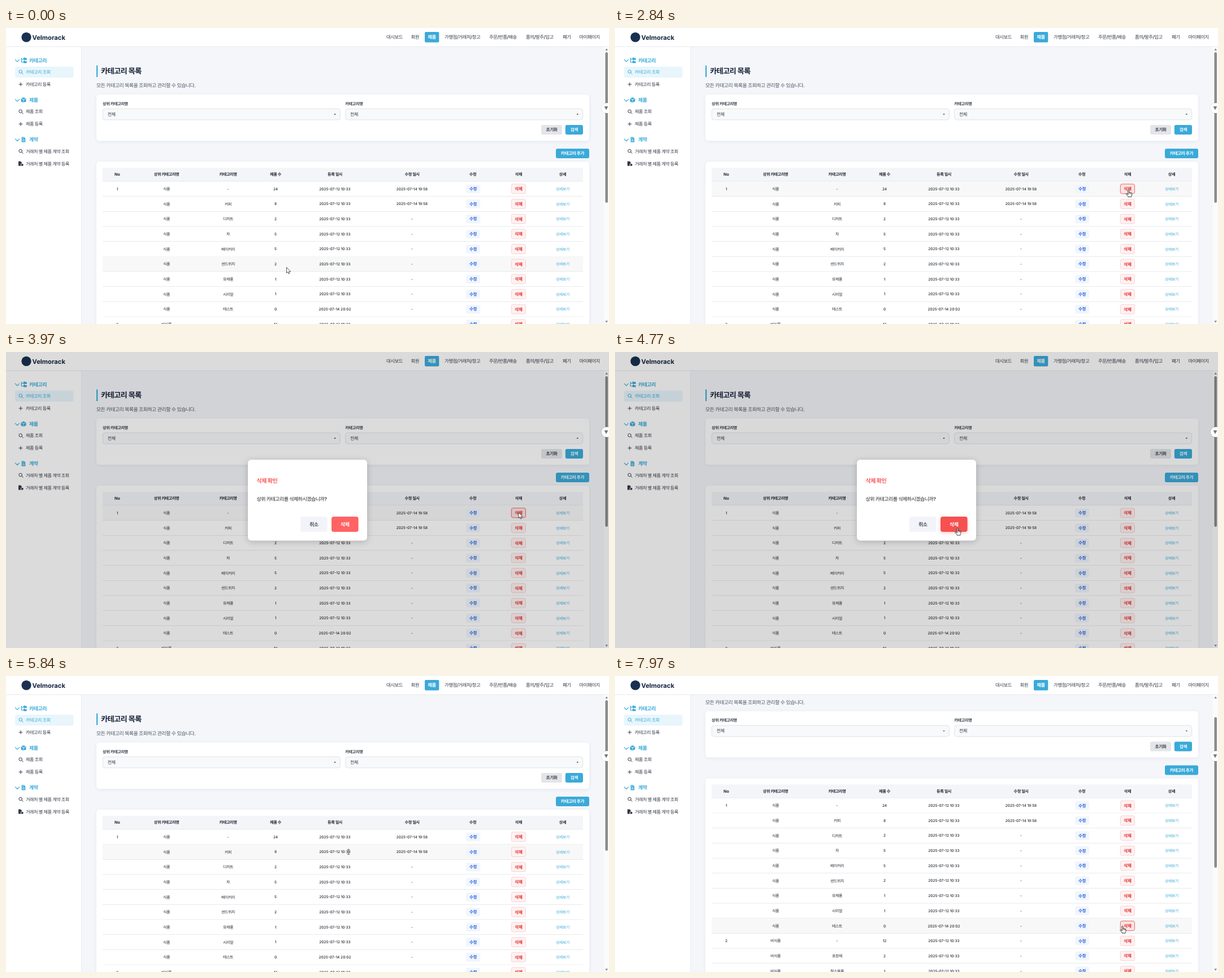
Animation, 1067 px wide and 525 px high, one loop 8 s. Source, as an HTML page with a canvas:

```html
<!DOCTYPE html>
<html lang="ko">
<head>
<meta charset="utf-8">
<title>카테고리 목록</title>
<style>
html, body { margin: 0; width: 100%; height: 100%; overflow: hidden; background: #fff; }
canvas { display: block; }
</style>
</head>
<body>
<canvas id="stage" width="1067" height="525"></canvas>
<script>
const ctx = document.getElementById('stage').getContext('2d');
const LOOP = 8000, STEP = 66.5;
const BLUE = '#3aaad9', NAVY = '#172238', INK = '#343a46', RED = '#e03131';
const FONT = 'Inter, "Noto Sans CJK KR", "Noto Sans CJK JP", sans-serif';
const ROW_TOP = 272, ROW_H = 26.67;
const COLUMNS = [197, 284, 393, 477, 582, 718.5, 826, 907, 985];
const HEADS = ['No', '상위 카테고리명', '카테고리명', '제품 수', '등록 일시', '수정 일시', '수정', '삭제', '상세'];
const CREATED = '2025-07-12 10:33', EDITED = '2025-07-14 19:58';
const ROWS = [
  ['1', '식품', '-', '24', CREATED, EDITED],
  ['', '식품', '커피', '8', CREATED, EDITED],
  ['', '식품', '디저트', '2', CREATED, '-'],
  ['', '식품', '차', '5', CREATED, '-'],
  ['', '식품', '베이커리', '5', CREATED, '-'],
  ['', '식품', '샌드위치', '2', CREATED, '-'],
  ['', '식품', '유제품', '1', CREATED, '-'],
  ['', '식품', '시리얼', '1', CREATED, '-'],
  ['', '식품', '테스트', '0', '2025-07-14 20:02', '-'],
  ['2', '비식품', '-', '12', CREATED, '-'],
  ['', '비식품', '포장재', '2', CREATED, '-'],
  ['', '비식품', '청소용품', '1', CREATED, '-']
];
// start time, number of steps, target x, target y
const MOVES = [
  [500, 13, 909, 278], [2770, 9, 906, 346], [3440, 6, 907, 285],
  [4300, 8, 606, 312], [6705, 9, 657, 443], [7300, 11, 898, 443]
];

function progress(t, start, steps) {
  const p = Math.max(0, Math.min(1, (Math.floor((t - start) / STEP) + 1) / steps));
  return p * p * (3 - 2 * p);
}

function pointerAt(t) {
  let x = 496.5, y = 425;
  for (const [start, steps, tx, ty] of MOVES) {
    const p = progress(t, start, steps);
    x += (tx - x) * p;
    y += (ty - y) * p;
  }
  return { x, y };
}

function text(s, x, y, size, color = INK, weight = 500, align = 'left') {
  const hangul = /[가-힣]/.test(s);
  ctx.font = `${weight} ${size}px ${FONT}`;
  ctx.letterSpacing = hangul ? `${-0.055 * size}px` : '0px';
  ctx.textAlign = align;
  ctx.fillStyle = color;
  ctx.fillText(s, x, y + size * 0.37);
}

function box(x, y, w, h, r, fill, stroke, shadow) {
  ctx.save();
  ctx.beginPath();
  ctx.roundRect(x, y, w, h, r);
  if (shadow) {
    [ctx.shadowColor, ctx.shadowBlur, ctx.shadowOffsetY] = shadow;
  }
  ctx.fillStyle = fill;
  ctx.fill();
  ctx.restore();
  if (stroke) {
    ctx.strokeStyle = stroke;
    ctx.lineWidth = 0.7;
    ctx.stroke();
  }
}

function button(label, x, y, w, h, r, fill, color, size, weight = 700, stroke, shadow) {
  box(x, y, w, h, r, fill, stroke, shadow);
  text(label, x + w / 2, y + h / 2, size, color, weight, 'center');
}

function path(d, x, y, fill, stroke, width = 1) {
  const p = new Path2D(d);
  ctx.save();
  ctx.translate(x, y);
  ctx.lineJoin = ctx.lineCap = 'round';
  ctx.lineWidth = width;
  if (fill) { ctx.fillStyle = fill; ctx.fill(p); }
  if (stroke) { ctx.strokeStyle = stroke; ctx.stroke(p); }
  ctx.restore();
}

function circle(x, y, r, fill) {
  box(x - r, y - r, 2 * r, 2 * r, r, fill);
}

const icons = {
  search: (y, c) => path('M2 -.8A2.8 2.8 0 1 1 -3.6 -.8A2.8 2.8 0 1 1 2 -.8M1.3 1.2L3.8 3.6', 26.5, y, null, c),
  plus: (y, c) => path('M-3 0H3M0 -3V3', 26, y, null, c),
  report: (y, c) => {
    path('M-4 -4H0L2 -2V4H-4Z', 26, y, c);
    circle(28.5, y + 2, 2.6, '#fff');
    circle(28.7, y + 2.1, 2, c);
  },
  tree: y => {
    path('M-4 -4V3.2H0M-4 -2H0', 31.5, y, null, BLUE, 1.2);
    path('M-.5 -4.8H2L2.7 -4H5.3V-.6H-.5ZM-.5 .8H2L2.7 1.6H5.3V5H-.5Z', 31.5, y, BLUE);
  },
  cube: y => {
    path('M0 -4.6L4.5 -2.8V2.8L0 4.6L-4.5 2.8V-2.8Z', 31, y, BLUE);
    path('M-3.6 -2.3L0 -.8L3.6 -2.3M0 -.8V3.6', 31, y, null, '#fff', 0.8);
  },
  file: y => {
    path('M-3.3 -4.5H1L3.3 -2.2V4.5H-3.3Z', 31, y, BLUE);
    path('M-1.8 -2.6H0M-1.8 .2H1.8M-1.8 2.2H1.8', 31, y, null, '#fff', 0.8);
  }
};

function sidebar() {
  box(0, 33, 133, 492, 0, '#fff');
  box(133, 33, 0.8, 492, 0, '#e6e9ee');
  box(16, 68.5, 103.5, 19.5, 3, '#e8f6fc');
  const sections = [
    [57.3, 'tree', '카테고리', ['search', '카테고리 조회'], ['plus', '카테고리 등록']],
    [127.7, 'cube', '제품', ['search', '제품 조회'], ['plus', '제품 등록']],
    [198, 'file', '계약', ['search', '거래처 별 제품 계약 조회'], ['report', '거래처 별 제품 계약 등록']]
  ];
  sections.forEach(([y, icon, title, ...items], s) => {
    path('M-3.6 -1.6L0 2L3.6 -1.6', 20, y + 0.5, null, BLUE, 1.2);
    icons[icon](y);
    text(title, 41, y, 8.95, BLUE, 700);
    items.forEach(([kind, label], i) => {
      const color = s + i === 0 ? BLUE : INK, itemY = y + 20.8 + i * 21.8;
      icons[kind](itemY, color);
      text(label, 35, itemY, 8.1, color);
    });
  });
}

function header() {
  box(0, 0, 1067, 33, 0, '#fff');
  box(0, 32.6, 1067, 0.8, 0, '#e4e7ec');
  circle(36, 16.3, 8.6, '#19304f');
  text('Velmorack', 46.5, 16.5, 11.2, '#14243f', 700);
  box(741, 7, 25.3, 18.5, 2, BLUE);
  const links = [[673, '대시보드'], [716.5, '회원'], [746.3, '제품'], [776, '가맹점/거래처/창고'],
    [855, '주문/반품/배송'], [920, '품의/발주/입고'], [985, '폐기'], [1014.5, '마이페이지']];
  for (const [x, label] of links) {
    const active = label === '제품';
    text(label, x, 16, 8.4, active ? '#fff' : INK, active ? 700 : 500);
  }
}

function select(x, w, label) {
  text(label, x, 134, 7.2, INK, 700);
  box(x + 0.3, 143.3, w, 19.6, 4, '#f8f9fa', '#d3d7dc');
  text('전체', x + 8.8, 153, 8, INK);
  path('M-1.8 -.7H1.8L0 1.2Z', x + w - 9, 153, INK);
}

function tableRow(row, i, hover) {
  const top = ROW_TOP + i * ROW_H, y = top + ROW_H / 2;
  if (hover.row === i) box(171, top, 850, ROW_H, 0, '#f8f8f8');
  box(171, top + ROW_H - 0.4, 850, 0.7, 0, '#dfe3e8');
  row.forEach((value, c) => text(value, COLUMNS[c], y, /[가-힣]/.test(value) ? 6.9 : 6.5, '#23272f', 500, 'center'));
  button('수정', 814, y - 7.7, 25, 15.4, 3, '#f1f5fe', '#2b67dc', 7.5);
  const hot = hover.row === i && hover.remove;
  button('삭제', 894.3, y - 8.5, 25.2, 17, 3, hot ? '#fbe3e3' : '#fff1f1', RED, 7.7, 700, hot ? RED : '#f6c3c3');
  text('상세보기', 985, y, 6.8, BLUE, 500, 'center');
}

function content(scroll, hover) {
  const soft = ['rgba(30,50,80,.07)', 6, 1.5];
  box(133.8, 33.4, 924.2, 491.6, 0, '#f4f6fa');
  ctx.save();
  ctx.beginPath();
  ctx.rect(133.8, 33.4, 924.2, 491.6);
  ctx.clip();
  ctx.translate(0, -scroll);
  box(160, 66.5, 2.2, 20.5, 0, BLUE);
  text('카테고리 목록', 168, 76.5, 13.3, NAVY, 700);
  text('모든 카테고리 목록을 조회하고 관리할 수 있습니다.', 160, 102, 8.9, '#4d5563', 400);
  box(160, 118, 872, 82, 5, '#fff', null, soft);
  select(171, 420, '상위 카테고리명');
  select(600.3, 420, '카테고리명');
  button('초기화', 947, 172, 37, 17, 3, '#e3e5e9', INK, 7.7);
  button('검색', 989.8, 172, 31.2, 17, 3, BLUE, '#fff', 7.7);
  button('카테고리 추가', 973, 214, 59, 17, 3, BLUE, '#fff', 7.7);
  box(160, 237, 872, 400, 5, '#fff', null, soft);
  box(171, 248, 850, 24, 0, '#f3f5f9');
  box(171, 271.5, 850, 0.7, 0, '#dfe3e8');
  HEADS.forEach((head, c) => text(head, COLUMNS[c], 259.8, 7.15, '#23272f', 700, 'center'));
  ROWS.forEach((row, i) => tableRow(row, i, hover));
  ctx.restore();
}

function scrollbar(scroll) {
  box(1058, 33.4, 9, 491.6, 0, '#fbfbfb');
  path('M-2.4 1.8L0 -1.8L2.4 1.8Z', 1062.7, 38, '#868686');
  path('M-2.4 -1.8L0 1.8L2.4 -1.8Z', 1062.7, 521, '#868686');
  box(1060.4, 43 + scroll * 0.54, 4.6, 267, 2.3, '#8b8b8b');
}

function modal(alert, hot) {
  box(428, 191, 211, 143.5, 6, '#fff', null, ['rgba(0,0,0,.2)', 12, 2]);
  text(alert ? '알림' : '삭제 확인', 443.5, 228, 10.1, alert ? '#fca311' : '#fb5a5c', 700);
  text(alert ? '카테고리에 매핑된 제품이 있어 삭제할 수 없습니다.' : '상위 카테고리를 삭제하시겠습니까?', 443.5, 261, 8.95, '#222');
  if (!alert) button('취소', 521, 292, 47.5, 27, 4, '#f3f4fa', '#4b4f5c', 8.9);
  const fill = alert ? (hot ? '#f09a00' : '#fda305') : (hot ? '#f65050' : '#ff6364');
  button(alert ? '확인' : '삭제', 576, 292, 47.6, 27, 4, fill, '#fff', 8.9, 700, null,
    hot && ['rgba(255,90,80,.3)', 7, 2]);
}

const within = (v, center, half) => Math.abs(v - center) <= half;

function hoverAt({ x, y }, scroll) {
  const docY = y + scroll;
  const row = x > 171 && x < 1021 && docY >= ROW_TOP ? Math.floor((docY - ROW_TOP) / ROW_H) : -1;
  if (!ROWS[row]) return { row: -1, cursor: 'arrow' };
  const dy = docY - ROW_TOP - (row + 0.5) * ROW_H;
  const remove = within(x, 907, 12.7) && within(dy, 0, 8.6);
  const link = within(x, 826, 12.5) && within(dy, 0, 7.7) || within(x, 985, 12) && within(dy, 0, 5);
  const overText = ROWS[row].some((s, c) => within(x, COLUMNS[c], s.length > 9 ? 27.5 : s.length * 3) && within(dy, 0, 5));
  return { row, remove, cursor: remove || link ? 'hand' : overText ? 'beam' : 'arrow' };
}

function drawCursor(kind, { x, y }) {
  if (kind === 'arrow') {
    path('M0 0V9.6L2.2 7.6L3.7 11L5.2 10.3L3.8 7.1H6.8Z', x, y, '#fff', '#111', 0.7);
  } else if (kind === 'hand') {
    path('M-1 1Q0 -.6 1 1V5Q2 4.2 2.8 5.2Q4 4.6 4.5 5.7Q5.9 5.3 6 6.8V9Q6 10.6 5 11.4V13H-.8V12L-4 8.4Q-4.6 7 -3.4 6.9L-1 8.6Z', x, y, '#fff', '#111', 0.8);
    path('M1 5V7.3M2.8 5.3V7.5M4.5 5.9V7.7', x, y, null, '#111', 0.6);
  } else {
    path('M-1.8 -4.4H-.5L0 -4L.5 -4.4H1.8M0 -4V4M-1.8 4.4H-.5L0 4L.5 4.4H1.8', x, y, null, '#333', 0.8);
  }
}

function draw(now) {
  const t = now % LOOP;
  const pointer = pointerAt(t);
  const scroll = 55.6 * progress(t, 6440, 4);
  const open = t >= 3970 && t < 5840, active = open && t < 5770;
  const hover = hoverAt(pointer, scroll);
  const hot = active && within(pointer.x, 600, 24) && within(pointer.y, 305.5, 13.5);
  const fading = t < 4035;

  ctx.textRendering = 'geometricPrecision';
  ctx.clearRect(0, 0, 1067, 525);
  content(scroll, open && !fading ? { row: -1 } : hover);
  sidebar();
  header();
  scrollbar(scroll);
  if (open) {
    box(0, 0, 1067, 525, 0, `rgba(0,0,0,${fading || !active ? 0.14 : 0.15})`);
    modal(t >= 5040, hot);
  }
  box(1054, 133, 18, 18, 9, '#fff', null, ['rgba(0,0,0,.12)', 3, 0]);
  path('M-3.4 -3H3.4L0 3.4Z', 1062, 142, '#777');
  drawCursor(active ? (hot ? 'hand' : 'arrow') : hover.cursor, pointer);
  requestAnimationFrame(draw);
}
requestAnimationFrame(draw);
</script>
</body>
</html>
```
